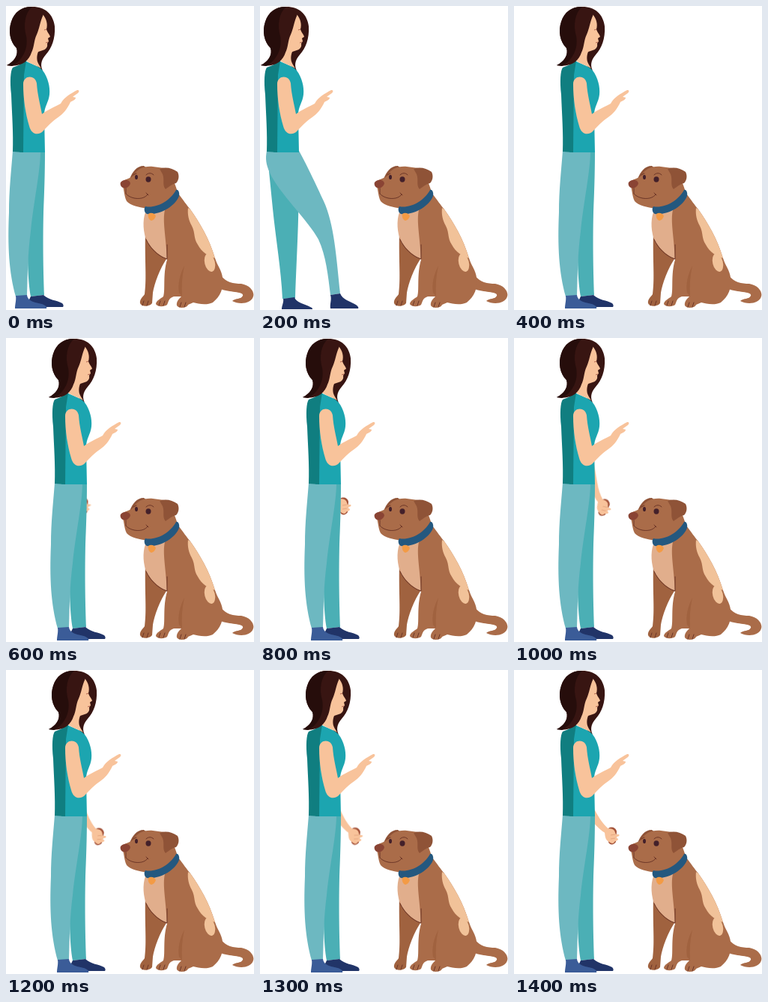
Recreate the animation shown at these times as an HTML page. Size 331 by 405 pixels, loop 2.4 s.

```html
<!DOCTYPE html>
<html lang="en">
<head>
<meta charset="utf-8">
<title>Dog training</title>
<style>
  html, body { margin: 0; width: 100%; height: 100%; overflow: hidden; background: #fff; }
  svg { display: block; width: 100%; height: 100%; }

  .skin { fill: #f8c39b; }
  .hair { fill: #381512; }
  .hair-dark { fill: #260d0b; }
  .shirt { fill: #1ca5b0; }
  .shirt-back { fill: #107e80; }
  .pants { fill: #6db8c1; }
  .pants-far { fill: #4bafb5; }
  .shoe { fill: #3b5c98; }
  .shoe-far { fill: #213468; }
  .treat { fill: #a4543b; }
  .fur { fill: #aa6c49; }
  .fur-shade { fill: #a0623f; }
  .fur-dark { fill: #8f5337; }
  .chest { fill: #e1ae8c; }
  .patch { fill: #f1c299; }
  .collar { fill: #24587f; }
  .tag { fill: #f39b45; }
  .nose { fill: #8a4434; }
  .dark { fill: #43202a; }
  .line { fill: none; stroke: #6b3527; stroke-width: 1; stroke-linecap: round; stroke-linejoin: round; }

  .woman, .stand, .stride { animation: 2400ms step-end infinite; }
  .woman { animation-name: walk; }
  .stand { animation-name: stand; }
  .stride { animation-name: stride; }
  .arm { transform-origin: 131px 221px; animation: reach 2400ms infinite; }

  @keyframes walk {
    0% { transform: translateX(0); }
    16.666%, 100% { transform: translateX(56px); }
  }
  @keyframes stand {
    0% { visibility: visible; }
    8.333% { visibility: hidden; }
    16.666%, 100% { visibility: visible; }
  }
  @keyframes stride {
    0% { visibility: hidden; }
    8.333% { visibility: visible; }
    16.666%, 100% { visibility: hidden; }
  }
  /* The hand comes out from behind the hip, one pose every 100 ms. */
  @keyframes reach {
    0%, 16.666% { transform: translate(-36px, 2px) rotate(0deg); animation-timing-function: steps(4); }
    33.333% { transform: translate(-19px, 3px) rotate(0deg); animation-timing-function: steps(2); }
    41.666% { transform: translate(-11px, 5px) rotate(20deg); animation-timing-function: steps(2); }
    50% { transform: translate(-7px, 1px) rotate(8deg); animation-timing-function: steps(2); }
    58.333%, 100% { transform: translate(0, 0) rotate(0deg); }
  }
</style>
</head>
<body>
<svg viewBox="0 0 331 405" preserveAspectRatio="none">
  <clipPath id="front"><rect x="86" y="150" width="80" height="100"/></clipPath>

  <g class="dog">
    <!-- tail -->
    <path class="fur" d="M287 359C293 368 304 370 314 370C326 372 332 381 330 387C327 397 311 398 302 393C306 389 314 391 316 386C318 380 299 382 286 377Z"/>
    <!-- far front leg -->
    <path class="fur-shade" d="M186 300L216 334C205 350 198 370 196 382L195 396C191 401 181 401 179 396C178 391 183 387 185 384C188 362 185 342 186 300Z"/>
    <!-- body and near legs -->
    <path class="fur" d="M187 274L230 250C237 259 241 265 246 271C258 288 271 309 279 336C282 346 288 352 289 362C291 376 286 387 276 395C268 399 257 397 250 395L243 398C241 403 230 403 228 399C227 394 231 390 234 387L224 387C217 389 217 394 215 398C211 401 202 401 200 397C200 393 206 390 210 387C213 378 209 358 215 338L200 318C185 300 183 285 187 274Z"/>
    <path class="chest" d="M186 275L213 268C208 284 213 302 215 337C207 334 195 325 188 313C183 302 182 286 186 275Z"/>
    <path class="patch" d="M243 269L246 271C258 288 271 309 279 336C271 334 261 328 256 318C250 309 253 303 248 293C244 286 242 278 243 269Z"/>
    <ellipse class="patch" cx="272" cy="342" rx="6.8" ry="12.3" transform="rotate(-14 272 342)"/>
    <path class="fur-shade" d="M238 346C232 358 229 370 231 382L235 387C234 373 235 360 238 346Z"/>
    <path class="line" d="M187 311C193 324 204 334 215 337V318M184 393L182 399M190 393L188 399M206 393L204 399M212 393L210 399M234 395L232 401M240 395L238 401"/>
    <!-- head -->
    <path class="fur-dark" d="M165 230C169 221 174 213 184 213L189 217L176 227Z"/>
    <path class="fur" d="M154 235C159 230 166 230 170 226C175 217 184 213 196 214L211 216C222 225 226 238 229 248C222 260 207 268 190 270C177 268 166 266 161 260C157 252 158 242 154 235Z"/>
    <path class="fur-dark" d="M205 217C213 214 222 216 229 221C232 227 230 233 227 236C222 237 217 241 213 244C208 239 212 231 209 224Z"/>
    <path class="nose" d="M153 235C157 230 165 231 166 236C165 241 160 244 156 242C153 241 152 237 153 235Z"/>
    <ellipse class="dark" cx="174" cy="228" rx="2" ry="3.1"/>
    <ellipse class="dark" cx="190" cy="231" rx="3.5" ry="3.7"/>
    <path class="line" d="M160 243L160 250C167 258 184 259 189 251M187 249L190 252M170 225L174 223M187 225C190 222 194 222 197 225"/>
    <!-- collar -->
    <path class="collar" d="M186 267C200 270 219 260 227 245C230 244 232 249 231 253C226 267 205 279 188 277C184 275 184 269 186 267Z"/>
    <path class="tag" d="M190 277C194 274 199 277 200 280C199 282 198 285 194 286C191 285 189 281 190 277Z"/>
  </g>

  <g class="woman">
    <g transform="translate(-56)" clip-path="url(#front)">
      <g class="arm">
        <path class="skin" d="M85 158L96 166L108 187C114 198 120 207 127 212L123 218C116 214 110 208 105 202L85 176Z"/>
        <path class="treat" d="M126 211C130 208 136 210 137 215L136 229C133 234 127 233 126 229Z"/>
        <path class="skin" d="M121 213C126 210 132 211 134 214L136 219L140 219C142 221 138 222 136 223L139 225C139 228 134 228 134 229C133 232 129 231 127 229C122 227 121 221 121 213Z"/>
        <path d="M129 220L135 219M129 225L135 224" fill="none" stroke="#d8946f" stroke-width=".6"/>
      </g>
    </g>

    <g class="stand">
      <path class="pants-far" d="M40 193H52C52 225 51 250 50 275C49 320 50 360 51 385L33 387C29 365 28 330 30 280Z"/>
      <path class="pants" d="M9 193H46C46 220 37 260 33 300C29 330 29 355 28 386L13 387C4 355 2 320 4 275C4 245 7 220 9 193Z"/>
      <path class="shoe-far" d="M33 387L50 385C57 392 68 392 75 396C77 398 77 400 76 401H52L30 393Z"/>
      <path class="shoe" d="M13 386L28 385C29 394 40 395 48 397C53 399 55 401 54 403H12C12 397 14 392 13 386Z"/>
    </g>

    <g class="stride">
      <path class="pants-far" d="M11 210L51 225C53 270 49 330 47 389L30 390C28 350 21 310 17 270Z"/>
      <path class="pants" d="M9 193H52C60 207 75 238 85 260C99 290 102 335 107 383L94 385C91 360 88 332 78 311C64 285 25 249 13 222C8 211 7 203 9 193Z"/>
      <path class="shoe-far" d="M31 390L46 388C48 395 60 397 67 401C70 402 70 403 70 404H29C29 399 32 395 31 390Z"/>
      <path class="shoe-far" d="M94 385L107 383C110 391 121 394 128 398C131 400 132 402 131 403H94C93 397 96 391 94 385Z"/>
    </g>

    <!-- hair behind the face -->
    <path class="hair" d="M33 1C51 0 63 10 65 27C66 44 61 56 53 65C46 73 46 80 49 86C42 83 38 76 38 66L20 30Z"/>
    <!-- torso -->
    <path class="shirt" d="M26 73C32 77 43 79 49 86C56 95 59 108 58 118C57 128 51 134 51 145L52 195H18V78Z"/>
    <path class="shirt-back" d="M27 73L24 92L23 195L9 194C10 170 8 145 7 118C5 100 6 86 9 82C16 79 22 77 27 73Z"/>
    <!-- neck and face -->
    <path class="skin" d="M27 73L33 56L44 59C41 64 41 70 42 74C43 77 45 80 47 83C40 79 33 77 27 73Z"/>
    <path class="skin" d="M49 11C54 17 56 24 54 31C55 35 59 39 59 41L56 43L57 47L55 50C56 55 53 58 49 59L40 62L34 62L35 34Z"/>
    <path class="hair" d="M50 11C45 22 45 29 41 38C37 46 38 54 34 62C30 74 20 82 1 79C11 74 17 65 14 56C5 47 3 33 7 21C11 8 21 1 33 1C42 2 48 5 50 11Z"/>
    <path class="hair-dark" d="M35 1C25 9 23 26 27 40C30 56 23 72 8 80L1 79C11 74 17 65 14 56C5 47 3 33 7 21C11 8 21 1 35 1Z"/>
    <path d="M51 32L54 31M53 49L56 48" fill="none" stroke="#a0503f" stroke-width=".8"/>
    <!-- raised arm -->
    <path class="skin" d="M23 104C23 92 39 91 41 103C42 119 46 132 48 144C56 138 66 134 73 130C78 121 86 117 95 112C98 112 98 114 96 116L89 121L93 122C93 125 89 126 86 128C82 137 76 144 70 148C61 154 56 160 50 166C44 173 34 172 31 160C26 143 23 124 23 104Z"/>
  </g>
</svg>
</body>
</html>
```
